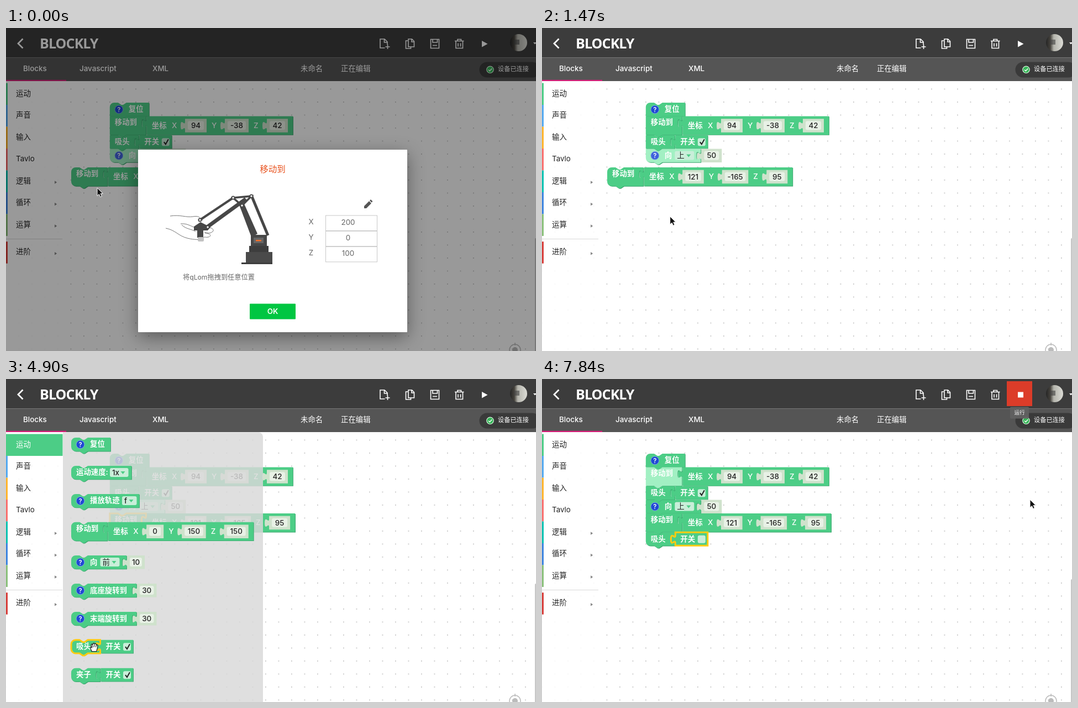
An HTML page that plays this animation: 959 px wide and 584 px high, repeating every 7.99 s.

```html
<!DOCTYPE html>
<html lang="zh-CN">
<head>
<meta charset="utf-8">
<title>Blockly</title>
<style>
html, body { margin: 0; width: 100%; height: 100%; overflow: hidden; background: #fff; }
svg { display: block; width: 959px; height: 584px; }
text { font: 500 13.4px Inter, "Noto Sans CJK SC", "Noto Sans CJK", sans-serif; fill: #fff; white-space: pre; }
.label { font-weight: 600; }
.dark { fill: #222; }
.side { fill: #222; font-weight: 400; }
.grey { fill: #666; font-weight: 400; }
.mid { text-anchor: middle; }
.title { font: 700 25px "Open Sans", "Noto Sans", sans-serif; letter-spacing: -.9px; }
.small { font-size: 11.2px; }
.tip { font-size: 9.6px; }
.caption { font-size: 12.2px; }
.head { font-size: 15.5px; fill: #e8531f; }
.line { fill: none; stroke: #fff; stroke-width: 1.6; }
</style>
</head>
<body>
<svg id="stage" viewBox="0 0 959 584"></svg>
<script>
const LOOP = 7990, TICKS = 54;
const GREEN = '#4ccd86', PALE = '#a2f0c3', YELLOW = '#fc1';

const text = (x, y, s, cls = '') => `<text x="${x}" y="${y + 4.8}" class="${cls}">${s}</text>`;
const rect = (x, y, w, h, fill, more = '') => `<rect x="${x}" y="${y}" width="${w}" height="${h}" fill="${fill}" ${more}/>`;
const path = (d, fill, more = '') => `<path d="${d}" fill="${fill}" ${more}/>`;
const circle = (x, y, r, fill, more = '') => `<circle cx="${x}" cy="${y}" r="${r}" fill="${fill}" ${more}/>`;
const at = (x, y, s) => `<g transform="translate(${x} ${y})">${s}</g>`;

// ---- blocks ----
const raised = (d, fill, sel) => path(d, '#3aa56d', 'transform="translate(.9 .9)"') +
  path(d, fill, sel ? `stroke="${YELLOW}" stroke-width="3"` : '');

// Statement outline; o.top / o.end round the left corners, o.socket cuts the right edge.
function statement(w, h, o) {
  const socket = o.socket ? 'v5c0,10 -8,-8 -8,7.5s8,-2.5 8,7.5' : '';
  const d = (o.top ? 'M0,8a8,8 0 0 1 8,-8' : 'M0,0') + `H15l6,4h3l6,-4H${w}${socket}V${h}H30l-6,4h-3l-6,-4` +
    (o.end ? 'H8a8,8 0 0 1 -8,-8z' : 'H0z');
  return raised(d, o.pale ? PALE : GREEN, o.sel);
}
const valuePath = (w, h) => `M0,0H${w}V${h}H0V20c0,-10 -8,8 -8,-7.5s8,2.5 8,-7.5z`;

const label = (x, y, s) => text(x, y, s, 'label');
const slot = (x, y, w, s) => at(x, y,
  path(valuePath(w, 24.5), '#cfe2cc') + rect(5, 4, w - 10, 16, '#e8f1e6', 'rx="3"') + text(w / 2, 12, s, 'dark mid'));
const help = o => circle(16.5, 12.3, 7.4, o.pale ? '#3f63dc' : '#2049d4', 'stroke="#8fb4e8" stroke-width=".8"') +
  text(16.5, 12, '?', 'mid small label');
const dropdown = (x, w, s) => rect(x, 4, w, 16, '#c9eed9', 'rx="3"') + text(x + 4, 11.8, s, 'dark') +
  path(`M${x + w - 14},10h8l-4,5z`, GREEN);

const reset = (x, y, o) => at(x, y, statement(71, 24.5, o) + help(o) + label(34, 11.5, '复位'));

function moveTo(x, y, values, widths, o) {
  let sx = 69.7, inner = label(9.5, 16.5, '坐标');
  values.forEach((v, i) => {
    inner += text(sx - 24, 16.5, 'XYZ'[i]) + slot(sx, 4.8, widths[i], v);
    sx += widths[i] + 33;
  });
  const value = raised(valuePath(sx - 24, 33.5), GREEN) + inner;
  return at(x, y, at(66.5, 0, value) + statement(65.5, 33.8, {...o, socket: 1}) + label(9, 11.3, '移动到'));
}

function toggle(x, y, name, checked, o) {
  const tick = checked ? path('M44.5,12.5l3,4 5,-9', 'none', 'stroke="#222" stroke-width="2"') : '';
  const value = at(53.5, 0, raised(valuePath(58.5, 24), GREEN, o.valueSel) + label(9, 11.8, '开关') +
    rect(40.5, 5.5, 14, 14, o.hover ? '#e6f6ec' : '#c9eed9', 'rx="3"') + tick);
  const body = statement(52.5, 24.4, {...o, socket: 1}) + label(9, 11.8, name);
  return at(x, y, o.valueSel ? body + value : value + body);
}

function move(x, y, dir, n, w, slotW, o) {
  return at(x, y, slot(w + 1, 0, slotW, n) + statement(w, 24.4, {...o, socket: 1}) + help(o) +
    label(34, 11.8, '向') + dropdown(52.5, 35, dir));
}
const turn = (y, s, o) => at(118, y, slot(119, 0, 35.5, '30') + statement(118, 24.4, {...o, socket: 1}) + help(o) + label(34, 11.8, s));

// ---- pointer ----
const route = [[0, 165, 289], [1, 200, 270], [2, 270, 262], [3, 340, 310], [4, 400, 400], [5, 450, 495], [6, 470, 509],
  [7, 470, 509], [8, 395, 438], [11, 150, 292], [12, 134, 286], [13, 150, 285], [15, 203.5, 277], [18, 203.5, 277],
  [20, 100, 160], [21, 70, 128], [22, 65, 121], [23, 87, 142], [28, 190, 330], [30, 215, 430], [31, 190, 460],
  [32, 162, 482], [33, 159, 485], [34, 165, 470], [38, 228.5, 290.3], [39, 228.5, 290.3], [42, 285, 305],
  [43, 292, 295], [45, 292, 295], [46, 340, 268], [49, 864, 30], [51, 864, 30], [52, 872, 95], [53, 883, 218]];

function pointer(k) {
  const i = Math.max(1, route.findIndex(p => p[0] >= k));
  const [a, ax, ay] = route[i - 1], [b, bx, by] = route[i], f = (k - a) / (b - a);
  return [ax + (bx - ax) * f, ay + (by - ay) * f];
}
const arrow = path('M0,0V14.5l3.4,-3 2.3,5 2.6,-1.1 -2.2,-5H10.4z', '#111', 'stroke="#fff" stroke-width="1"');
const hand = path('M-4,7.5C-5,4 -7,2 -6.5,0c1,-1 2,0 3,1.5L-5,-4c0,-2 2,-2 2.5,-.5L-1.5,-6c.5,-2 2.5,-1.5 2.5,0L2,-6c1,-1.2 2.3,-.5 2.3,1l.6,1c1,-1 2,0 2,1.5 0,4 -1.5,6 -2,10z',
  '#fff', 'stroke="#111" stroke-width="1.2"') + path('M-2.4,-4l1,4M1,-5.5V-.5M4.3,-4L3.7,0', 'none', 'stroke="#111"');

// ---- page furniture ----
const defs = `<defs>
  <pattern id="dots" x="116.5" y="109.5" width="23.5" height="23.5" patternUnits="userSpaceOnUse"><rect width="1.7" height="1.7" fill="#bcbcbc"/></pattern>
  <linearGradient id="face"><stop offset="0" stop-color="#252525"/><stop offset=".25" stop-color="#45423c"/><stop offset=".45" stop-color="#b4b4ac"/><stop offset="1" stop-color="#dcdcd6"/></linearGradient>
</defs>`;

function header(k) {
  const icons = [
    'M685.5,36H677V20h8l5,5v5M684.5,20v6h6M690.5,30v8M686.5,34h8',
    'M727,23h-3.5v14h9v-3M728,20h6.5l4,4v10H728zM734,20v5h5',
    'M768.5,20.5h15v16h-15zM772,20.5v5.5h8.5v-5.5M772,31.5h8',
    'M812,23.5h16.5M814,24v12.5h12.5V24M817,23v-2.5h6.5V23M818,27.5v6M822.5,27.5v6'
  ].map(d => path(d, 'none', 'class="line"')).join('');
  const play = path('M861,23l10.5,5.7 -10.5,5.7z', '#fff'), stop = rect(861, 23.5, 10, 10, '#fff');
  return rect(0, 0, 959, 53.5, '#3c3c3c') + rect(0, 53.5, 959, 42.5, '#555') + rect(0, 93.8, 109, 2, '#e6177d') +
    path('M30.5,19.5l-8.5,8.5 8.5,8.5', 'none', 'stroke="#fff" stroke-width="2.8"') +
    '<text x="61" y="36.5" class="title">BLOCKLY</text>' + icons +
    (k >= 49 ? rect(841, 4, 46, 45, '#dc3c29') : '') + (k >= 51 ? stop : play) +
    circle(927.5, 26.5, 15.5, 'url(#face)') + rect(919, 21, 10, 9, '#444', 'opacity=".6"') + path('M954,26h6l-3,3.5z', '#fff') +
    text(31, 73.5, 'Blocks') + text(133, 73.5, 'Javascript') + text(265, 73.5, 'XML') +
    text(533, 73, '未命名') + text(606, 73, '正在编辑') +
    rect(856.5, 61.5, 110, 28, '#3a3a3a', 'rx="14"') + circle(876, 75.3, 6.2, '#36b557', 'stroke="#d8f3de" stroke-width="1.2"') +
    path('M873,75.5l2.3,2.3 4,-4.5', 'none', 'stroke="#fff" stroke-width="1.4"') + text(890, 73.6, '设备已连接', 'small') +
    (k >= 50 ? rect(847, 50.5, 34, 21, '#616161', 'rx="2" opacity=".95"') + text(864, 59.6, '运行', 'mid tip') : '');
}

const menu = [['运动', '#4ccd86'], ['声音', '#55a9f0'], ['输入', '#ffb52e'], ['Tavlo', '#f9706f'],
  ['逻辑', '#00c2b2'], ['循环', '#3f86e0'], ['运算', '#8bc17c'], ['进阶', '#d8403c']];

function sidebar(open) {
  return rect(0, 96, 103, 488, '#fff', 'opacity=".85"') + rect(0, 381, 102, 1, '#d8d8d8') + menu.map(([s, color], i) => {
    const y = 118.3 + i * 39.5 + (i == 7 ? 10.2 : 0), on = open && !i;
    return rect(0, y - 18.8, on ? 102.5 : 3, 39.5, color) + text(18, y - .4, s, on ? '' : 'side') +
      (i > 3 ? path(`M88,${y}v5.5l4.2,-2.7z`, '#888') : '');
  }).join('');
}

function flyout(k) {
  const o = {top: 1, end: 1}, x = 118;
  return path('M103,96.5H457a8,8 0 0 1 8,8V584H103z', '#d9d9d9', 'opacity=".83"') +
    reset(x, 106, o) +
    at(x, 157, statement(109, 24.4, o) + label(9, 11.6, '运动速度:') + dropdown(70, 33.5, '1x')) +
    at(x, 208, statement(123, 24.4, o) + help(o) + label(34, 11.6, '播放轨迹') + dropdown(92, 26.5, 'f')) +
    moveTo(x, 258.7, ['0', '150', '150'], [31, 43.5, 44], o) +
    move(x, 319, '前', '10', 100, 32, o) +
    turn(370, '底座旋转到', o) + turn(421, '末端旋转到', o) +
    toggle(x, 471.7, '吸头', true, {...o, sel: k >= 32}) + toggle(x, 522.7, '夹子', true, o);
}

function program(k, [px, py]) {
  const x = 187.8, joined = k >= 15, second = k >= 34, placed = k >= 38, running = k >= 51;
  const [mx, my] = joined ? [x, 243] : k >= 12 ? [px - 16, py - 34] : [118, 252];
  let s = reset(x, 135, {top: 1, pale: k == 51}) +
    moveTo(x, 159.4, ['94', '-38', '42'], [39, 43, 38], {pale: k >= 52}) +
    toggle(x, 193.7, '吸头', true, {}) +
    move(x, 218.4, '上', '50', 99.5, 37, {pale: !running, end: !joined}) +
    moveTo(mx, my, ['121', '-165', '95'], [38.6, 47.5, 38],
      {top: !joined, end: !placed, sel: k >= 12 && !second});
  if (second) {
    const [tx, ty] = placed ? [x, 277.2] : [px - 41, py - 13];
    s += toggle(tx, ty, '吸头', k < 44,
      {top: !placed, end: 1, sel: k < 42, valueSel: k >= 42, hover: k < 46});
  }
  if (k == 17) s += circle(209, 245, 11, 'none', 'stroke="#888" stroke-width="10" opacity=".5"');
  return s;
}

// ---- dialog ----
const rod = (d, w, color = '#474747') => path(d, 'none', `stroke="${color}" stroke-width="${w}"`);
const robot =
  rod('M297,340C315,337 326,343 338,341S350,343 356,348M289,362C306,365 312,376 328,380S346,381 356,384M316,354C328,353 333,358 343,361M318,356C326,364 335,363 343,368M358,362C370,358 378,364 374,368S365,371 359,369M360,371C371,371 372,377 366,378S360,377 357,379', 1, '#777') +
  rod('M411,307L351,347', 4) + rod('M411,307L444,304L427,321Z', 3.5) + rod('M445,305L474,375', 5) +
  rod('M434,309L361,362', 7) + path('M422,320l9,-2 24,54 -11,6z', '#474747') +
  path('M340,359l12,-8 18,9 -5,6H340z', '#474747') + rect(346, 364, 11, 15, '#474747') + rect(347, 378, 11, 8, '#c2c2c2', 'rx="2"') +
  [[411, 307], [444, 304], [427, 321], [351, 347], [365, 360]].map(([x, y]) => circle(x, y, 2.6, '#fff', 'stroke="#474747" stroke-width="1.8"')).join('') +
  rect(443, 374, 29, 21, '#474747') + rect(440, 394, 35, 12, '#3d3d3d') + rect(434, 405, 48, 21, '#4a4a4a') + rect(426, 424, 56, 3, '#3d3d3d') +
  rect(448, 379, 18, 10, '#666') + rect(452, 383, 10, 2.5, '#f4702a');

function dialog(k) {
  if (k > 8) return '';
  const closing = k == 8, fade = closing ? .47 : 1;
  const values = k < 4 ? ['200', '0', '100'] : ['121.44', '-165.33', '95.05'];
  const fields = values.map((v, i) => {
    const y = 338.5 + i * 28.2;
    return text(552, y + 11.5, 'XYZ'[i], 'grey mid') + rect(578.5, y + .5, 93, 27.5, '#fff', 'stroke="#c8c8c8"') + text(619, y + 12.7, v, 'grey mid');
  }).join('');
  return rect(0, 0, 959, 584, '#000', `opacity="${.4 * fade}"`) +
    `<g opacity="${fade}" transform="translate(0 ${closing ? 33.5 : 0})">` +
    rect(239, 220, 487, 330, '#fff', 'rx="1" style="filter:drop-shadow(0 9px 16px #0006)"') +
    text(482.6, 256.5, '移动到', 'head mid') + robot + fields +
    path('M648,326v-4l9,-9 4,4 -9,9zM658,312l2,-2 3.5,3.5 -2,2z', '#555') +
    text(320, 450.5, '将qLom拖拽到任意位置', 'grey caption') +
    rect(441, 498.5, 83, 28, closing ? '#86cf98' : '#00c642', 'rx="1"') + text(482.5, 512, 'OK', 'mid label') + '</g>';
}

function scene(k) {
  const pos = pointer(k), open = k >= 21 && k < 34;
  const grab = k >= 12 && k <= 18 || k >= 32 && k <= 39;
  const barTop = k < 17 ? 380 : k < 39 ? 370 : 362;
  return defs + rect(0, 96, 959, 488, '#fff') + rect(0, 96, 959, 488, 'url(#dots)') +
    rect(957, barTop, 3, 230, '#c6c6c6', 'rx="1.5"') +
    circle(921, 582, 10, 'none', 'stroke="#bbb" stroke-width="1.5"') + circle(921, 582, 5, '#bbb') + rect(920.3, 569, 1.5, 5, '#bbb') +
    program(k, pos) + (open ? flyout(k) : '') + sidebar(open) + header(k) + dialog(k) + at(...pos, grab ? hand : arrow);
}

const stage = document.getElementById('stage'), start = performance.now();
let shown = -1;
function draw() {
  const t = (performance.now() - start) % LOOP;
  const k = Math.min(TICKS - 1, Math.floor((t + 10) * TICKS / LOOP));
  if (k != shown) stage.innerHTML = scene(shown = k);
  requestAnimationFrame(draw);
}
draw();
</script>
</body>
</html>
```
